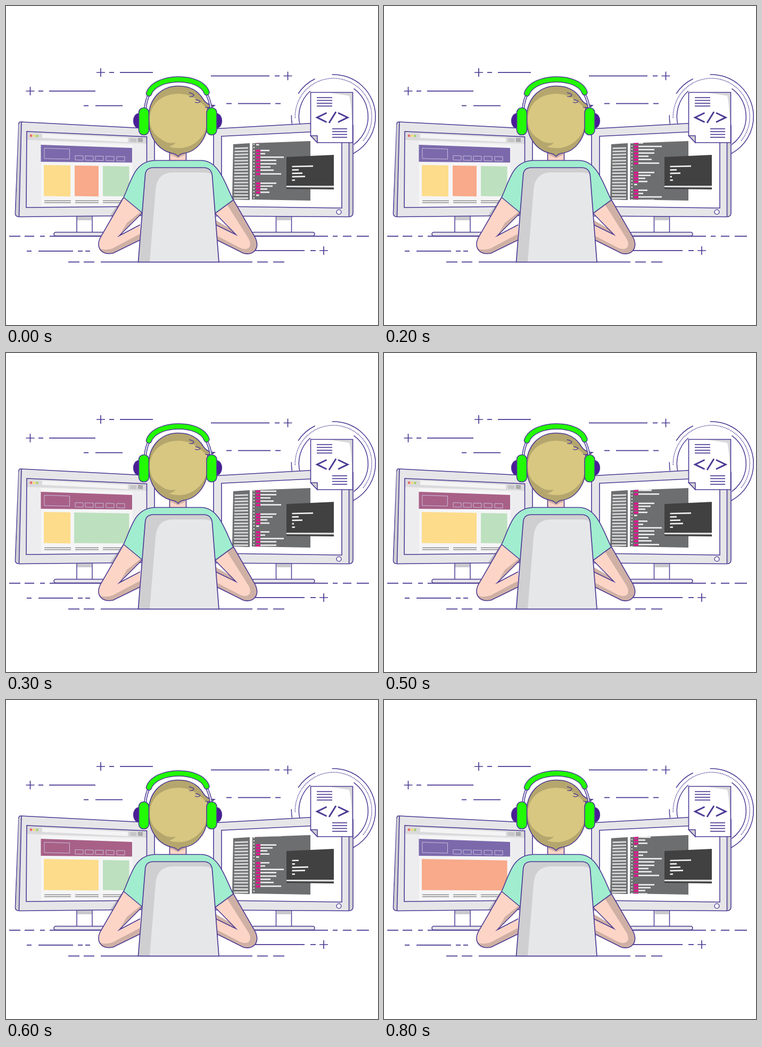
Write an HTML page with a canvas that moves like this. It is 699 by 600 pixels and loops after 0.9 s.

```html
<!DOCTYPE html>
<html lang="en">
<head>
<meta charset="utf-8">
<title>Coder at work</title>
<style>
html, body { margin: 0; width: 100%; height: 100%; overflow: hidden; background: #fff; }
canvas { display: block; }
</style>
</head>
<body>
<canvas id="stage" width="699" height="600"></canvas>
<script>
const ctx = document.getElementById('stage').getContext('2d');
const LOOP = 900, STEP = 100;
const INK = '#4d3a94', FRAME = '#e6e6e9', SHADE = '#cfcfd1';
const SKIN = '#fcd5c7', SKIN_DARK = '#cfb0a5', MINT = '#a1edcf', GREEN = '#22fb05';
const YELLOW = '#fddc8c', ORANGE = '#f8aa8a', LEAF = '#bde0be';
const VIOLET = '#7b69ac', PLUM = '#a86087';

function shape(d, fill, stroke, width = 1.6) {
  const p = new Path2D(d);
  if (fill) { ctx.fillStyle = fill; ctx.fill(p); }
  if (stroke) { ctx.strokeStyle = stroke; ctx.lineWidth = width; ctx.stroke(p); }
}

function bar(x1, x2, y, h, color) {
  ctx.fillStyle = color;
  ctx.fillRect(x1, y - h / 2, x2 - x1, h);
}

function dashes(y, ...xs) {
  for (let i = 0; i < xs.length; i += 2) bar(xs[i], xs[i + 1], y, 1.8, INK);
}

function plus(x, y) {
  shape(`M${x - 8} ${y}H${x + 8}M${x} ${y - 8}V${y + 8}`, null, INK, 1.7);
}

function disc(x, y, r, fill, stroke) {
  ctx.beginPath();
  ctx.arc(x, y, r, 0, 7);
  ctx.fillStyle = fill;
  ctx.fill();
  if (stroke) { ctx.strokeStyle = stroke; ctx.lineWidth = 1.4; ctx.stroke(); }
}

function pill(x, y, w, h, r, fill, width = 1.6) {
  ctx.beginPath();
  ctx.roundRect(x, y, w, h, r);
  ctx.fillStyle = fill;
  ctx.fill();
  ctx.strokeStyle = INK;
  ctx.lineWidth = width;
  ctx.stroke();
}

function ring(r, from, to, dash = [], width = 1.5) {
  ctx.beginPath();
  ctx.arc(615.3, 208, r, from * Math.PI / 180, to * Math.PI / 180);
  ctx.setLineDash(dash);
  ctx.strokeStyle = INK;
  ctx.lineWidth = width;
  ctx.stroke();
  ctx.setLineDash([]);
}

function backdrop() {
  plus(178, 125);
  dashes(125, 194, 203, 214, 276);
  plus(45.5, 160);
  dashes(160, 61, 70, 81, 168);
  dashes(187.5, 146, 155, 168, 219);
  dashes(131.5, 385, 495, 505, 514);
  plus(529.5, 131.5);
  dashes(183.5, 414, 424, 436, 497, 506, 516);
  dashes(433, 6, 27, 35, 53, 64, 73, 82, 605, 614, 623, 633, 649, 659, 682);
  dashes(461, 39, 48, 61, 126, 135, 144, 149, 158);
  dashes(460, 465, 561, 572, 582);
  plus(597, 460);
  dashes(481.5, 117, 138, 146, 166, 178, 463, 472, 492, 502, 523);
  ring(79, -92, 62);
  ring(79, 170, 182);
  ring(79, 213, 244);
  ring(72, 178, 400, [1.5, 1.5], 1.6);
  ring(65, -54, 54);
  ring(65, 165, 228);
}

function stand(x, baseLeft, baseRight) {
  pill(x, 390, 29, 37, 0, '#fff', 1.5);
  bar(x + 1, x + 28, 399, 8, '#c9c9cd');
  pill(baseLeft, 425.5, baseRight - baseLeft, 7, 3.5, FRAME);
}

function leftScreen(step) {
  stand(133, 90, 205);
  shape('M28 218L279 231V394L25 396.5Q17 396 17.5 390L24 222Q24 218 28 218Z', FRAME, INK);
  shape('M28 219L24 223L18.5 391L24 396Z', '#cfcfd4');
  shape('M29 219L24.5 396', null, INK);
  shape('M39 236L264.500 246V377L38 379Z', '#ededef');
  shape('M66 254L238 261V376L66 377Z', '#f5f5f6');
  shape('M39 236L264 246V259L39 252Z', '#dadadc');
  shape('M68 240L229 248V256L68 248Z', '#f4f4f5');
  shape('M233 248.500L245 249V256L233 255.500Z', '#c6c6c8');
  shape('M248 248L257 248.500V256L248 255.500Z', '#a9a9ab');
  ['#ee6a6e', '#f5dd72', '#a8cf70'].forEach((c, i) => disc(47 + i * 5.7, 244 + i * .2, 2.4, c));

  const pink = step > 2 && step < 7;
  shape('M65.500 261L237 267V294.500L65.500 293Z', pink ? PLUM : VIOLET);
  const light = '#c9bfdd';
  shape('M72 267.500L119.500 269V288L72 287Z', null, light, 1);
  [130, 149, 168, 188, 208].forEach((x, i) => {
    const y = 281.5 + i * .4;
    shape(`M${x} ${y}L${x + 15} ${y + .3}V${y + 8.500}L${x} ${y + 8}Z`, null, light, 1);
  });
  const card = (a, b, color) =>
    shape(`M${a} ${297.8 + a * .017}L${b} ${297.8 + b * .017}V358.300L${a} 357.500Z`, color);
  if (step < 3) {
    card(71, 121, YELLOW); card(129, 174, ORANGE); card(182, 231.5, LEAF);
  } else if (step < 5) {
    card(71, 121, YELLOW); card(128, 231.5, LEAF);
  } else if (step < 7) {
    card(71, 174, YELLOW); card(182, 231.5, LEAF);
  } else {
    card(71, 231.5, ORANGE);
  }
  [[72, 122], [130, 174], [182, 230]].forEach(([a, b]) => {
    bar(a, b, 366.3, 1.5, '#8d8d8f');
    bar(a, b, 369.8, 1.5, '#8d8d8f');
  });
  shape('M39 236L264.500 246V377L38 379Z', null, INK);
}

// Vertical offset and right end of each code line within one block.
const LINES = [[0, 495], [6, 487], [12.5, 522], [18.5, 508], [25, 508], [31, 497], [37, 503],
  [44, 517], [61.5, 508], [67, 501], [72.5, 491], [78.5, 495], [84, 0]];
const BLOCK = 95;

function code(step) {
  const panel = 'M463 258L572 254V366L462 364Z';
  shape(panel, '#6d6e70');
  ctx.save();
  ctx.clip(new Path2D(panel));
  const top = 272 - 10.1 * step;
  for (let y0 = top - BLOCK; y0 < 370; y0 += BLOCK) {
    for (let i = 0; i < 16; i++) bar(464.7, 467, y0 + i * BLOCK / 16, 2.3, '#e8e8e8');
    for (const [dy, end] of LINES) {
      const y = y0 + dy;
      if (end) {
        bar(469.5, 478, y + .3, 3.8, '#e0148c');
        bar(478, end, y - .2, 2.6, '#f0f0f0');
      } else {
        bar(470, 475.5, y, 2.6, '#f0f0f0');
      }
    }
  }
  ctx.restore();
}

const TERMINAL = [
  [577, 550, 557, 562, 543],
  [577, 550, 557, 541, 543],
  [550, 543, 568, 562, 543]
];
const TERMINAL_ORDER = [0, 1, 0, 2, 0];

function rightScreen(step) {
  stand(507.5, 462, 580);
  shape('M390 231L640 217Q652 217 652 227V389Q652 396.500 644 396.500L390 395Z', FRAME, INK);
  shape('M645 220L651 224V391L645 396Z', '#d3d3d7');
  shape('M644.500 219V396.500', null, INK);
  shape('M405 245L631 234V380L405 377Z', '#fff', INK);
  disc(625.5, 387.5, 4.4, '#fff', INK);

  shape('M427 260L458 258V365L425 364Z', '#6d6e70');
  for (let i = 0; i < 17; i++) {
    const y = 267.8 + i * 5.85;
    shape(`M${429.5 - i * .08} ${y}L455 ${y - .8 + i * .06}`, null, '#d6d6d6', 3);
  }
  code(step);
  shape('M527 284L616 280V345L527 344Z', '#414142');
  shape('M527 338L616 338V341.500L527 341Z', '#dcdcdc');
  TERMINAL[TERMINAL_ORDER[step >> 1]].forEach((end, i) => {
    const y = 302 + i * 6.4;
    shape(`M537.500 ${y}L${end} ${y - (end - 537) * .02}`, null, '#f0f0f0', 2.7);
  });
}

function documentIcon() {
  shape('M572.500 162.500H651.500V257H585L572.500 244Z', '#fff');
  shape('M607 163H651V245Q650 190 645 169Z', '#d9d9dc');
  shape('M572.500 162.500H651.500V257H585L572.500 244Z', null, INK);
  shape('M572.500 244H585V257Z', SHADE, INK, 1.5);
  for (let i = 0; i < 4; i++) {
    bar(584, 613, 172.3 + i * 5.3, 1.7, INK);
    bar(613, 641, 231 + i * 5.3, 1.7, INK);
  }
  shape('M602.500 201L584.500 209.700L602.500 218.500M620 199L607 220M624 201L642 209.700L624 218.500', null, INK, 3);
}

function body() {
  shape('M231 338L221 358L196 394H219L240 376Z', 'rgba(70,65,75,.25)');
  // left arm
  shape('M221 360L177 436C168 456 181 469 201 465L252 440V411L213 432L256 389Z', SKIN);
  shape('M176 456C182 459 190 459 200 456L251 429V441L201 465C186 468 178 464 176 456Z', SKIN_DARK);
  shape('M213 432L227 408L253 387L256 390Z', SKIN_DARK);
  shape('M221 360L177 436C168 456 181 469 201 465L252 440M252 411.500L213 432L256 389', null, INK);
  // right arm
  shape('M427 364L468 435C478 456 465 470 446 465L396 440V411L432 430L392 389Z', SKIN);
  shape('M427 364L468 435C478 456 465 470 446 465L396 440V432L440 455C457 461 463 452 456 438L415 373Z', SKIN_DARK);
  shape('M394 411L432 430L425 421L393 402Z', SKIN_DARK);
  shape('M427 364L468 435C478 456 465 470 446 465L396 440M394 411.500L432 430L392 389', null, INK);
  // neck and shirt
  shape('M307.500 268H338.500V292H307.500Z', SKIN, INK);
  shape('M308 272H338V279L323 286L308 279Z', SKIN_DARK);
  shape('M221 360C236 328 241 292 280 290.500H368C401 292 412 335 427 365L393 390H256Z', MINT);
  shape('M221 360C236 328 241 292 280 290.500H368C401 292 412 335 427 365L393 390M221 360L256 389', null, INK);
}

function chair() {
  const seat = 'M248.500 481.500L261.500 319Q262 304 277 304H371Q386 304 387.500 319L400 481.500Z';
  shape(seat, SHADE);
  shape('M270 481L281 347Q283 313 314 313H372Q384 313 387.500 319L400 481Z', '#e6e7e9');
  shape(seat, null, INK, 1.7);
}

function head() {
  const hair = 'M268 213C267 174 292 150.500 324 150.500C350 150.500 364 164 371 176Q378 187 392 187Q386 192 379 192V216C379 250 358 274 334 277Q327 278 323.500 283Q319 278 312 277C286 271 268 247 268 213Z';
  shape(hair, '#b4a66d');
  shape('M270 211C272 181 296 165 324 165C350 165 365 180 378 193V216C377 243 356 264 331 267Q315 268 306 264Q314 263 319 257Q302 260 291 250C277 242 270 229 270 211Z', '#d7c781');
  shape(hair, null, INK);
  shape('M344 163Q353 165 353 168Q350 172 344 170M356 176Q365 178 365 180Q361 183 355 181M374 190Q380 193 392 187', null, INK, 1.3);
  // headphones
  const sides = 'M261.500 194Q263 176 270 164M385.500 194Q383 176 376 164';
  shape(sides, null, INK, 5);
  shape(sides, null, '#e9e9f2', 2.2);
  ctx.lineCap = 'round';
  const arc = 'M268.500 164.500C281 129.500 366 129.500 377 162.500';
  shape(arc, null, INK, 11.5);
  shape(arc, null, GREEN, 8.6);
  ctx.lineCap = 'butt';
  shape('M250 202C236 203 236 229 250 230Z', '#4b1d97', INK, 1.3);
  shape('M395 202C409 203 409 229 395 230Z', '#4b1d97', INK, 1.3);
  pill(249.5, 191.5, 19, 51, 9, GREEN);
  pill(377, 191.5, 19, 51, 9, GREEN);
}

function draw(time) {
  const step = Math.floor(time % LOOP / STEP);
  ctx.fillStyle = '#fff';
  ctx.fillRect(0, 0, 699, 600);
  backdrop();
  leftScreen(step);
  rightScreen(step);
  documentIcon();
  body();
  chair();
  head();
}

const start = performance.now();
function tick() {
  draw(performance.now() - start);
  requestAnimationFrame(tick);
}
tick();
</script>
</body>
</html>
```
